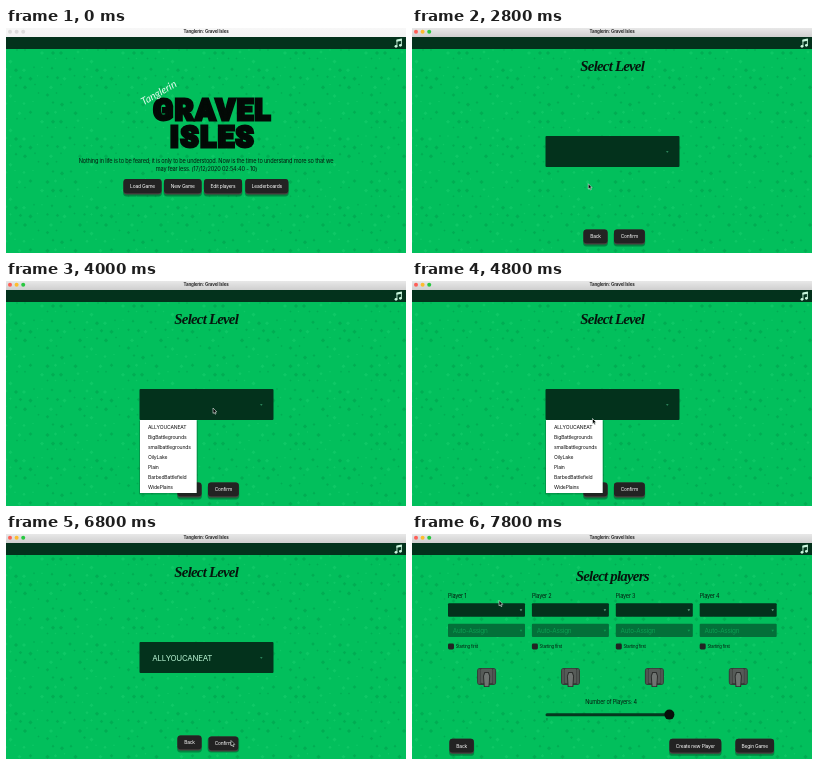
Animation, 400 px wide and 225 px high, one loop 8 s. Source, as an HTML page with a canvas:

```html
<!DOCTYPE html>
<html lang="en">
<head>
<meta charset="utf-8">
<title>Tanglerin: Gravel Isles</title>
<style>
  html, body { margin: 0; width: 100%; height: 100%; overflow: hidden; background: #02bf5c; }
  canvas { display: block; width: 100vw; height: 100vh; }
</style>
</head>
<body>
<canvas id="stage"></canvas>
<script>
const W = 400, H = 225, LOOP = 8000, STEP = 200;
const SANS = 'Inter, sans-serif', SERIF = '"Liberation Serif", serif';
const GREEN = '#02bf5c', DARK = '#03321c', INK = '#06180e', MINT = '#b8f2d2';
const canvas = document.getElementById('stage');
const ctx = canvas.getContext('2d');

// Moments at which the screens change
const LEVEL_AT = 2600, OPEN_AT = 3800, PICK_AT = 5800, PLAYERS_AT = 7000;
const LEVELS = ['ALLYOUCANEAT', 'BigBattlegrounds', 'smallbattlegrounds', 'OilyLake',
  'Plain', 'BarbedBattlefield', 'WidePlains'];

// Pointer path: time, x, y
const PATH = [
  [400, 200, 112], [1200, 179, 154.6], [2600, 179, 154.6], [3000, 173.5, 156.8],
  [3600, 207, 127], [4400, 207, 127], [5200, 154, 148], [5800, 154, 148],
  [6600, 225, 206.5], [7000, 225, 206.5], [7800, 87, 66.4]
];

function pointerAt(t) {
  if (t < PATH[0][0]) return null;
  for (let i = 1; i < PATH.length; i++) {
    const [t0, x0, y0] = PATH[i - 1], [t1, x1, y1] = PATH[i];
    if (t > t1) continue;
    const p = (t - t0) / (t1 - t0), k = p * p * (3 - 2 * p);
    return { x: x0 + (x1 - x0) * k, y: y0 + (y1 - y0) * k };
  }
  const [, x, y] = PATH[PATH.length - 1];
  return { x, y };
}

function inside(p, x, y, w, h) {
  return p && p.x >= x && p.x <= x + w && p.y >= y && p.y <= y + h;
}

function rect(x, y, w, h, fill, r = 0) {
  ctx.fillStyle = fill;
  ctx.beginPath();
  ctx.roundRect(x, y, w, h, r);
  ctx.fill();
}

function disc(x, y, r, fill) {
  ctx.fillStyle = fill;
  ctx.beginPath();
  ctx.arc(x, y, r, 0, Math.PI * 2);
  ctx.fill();
}

function poly(points, fill) {
  ctx.fillStyle = fill;
  ctx.beginPath();
  points.forEach(([x, y]) => ctx.lineTo(x, y));
  ctx.closePath();
  ctx.fill();
}

// Spacing defaults to the tight tracking of the interface font
function text(str, x, y, size, fill = INK, align = 'left', weight = '', family = SANS, spacing = -0.035 * size) {
  ctx.font = `${weight} ${size}px ${family}`;
  ctx.letterSpacing = spacing + 'px';
  ctx.textAlign = align;
  ctx.fillStyle = fill;
  ctx.fillText(str, x, y);
}

function backdrop() {
  rect(0, 0, W, H, GREEN);
  for (let j = 0; j < 24; j++) {
    for (let i = 0; i < 46; i++) {
      const seed = ((i % 9) * 37 + (j % 8) * 61 + (i % 9) * (j % 8) * 17) % 29;
      if (seed > 19) continue;
      const x = i * 9 + (j % 2) * 4.5 + seed % 3, y = 22 + j * 8.6 + seed % 4;
      const r = 1 + (seed % 4) * 0.35;
      const fill = seed % 3 ? 'rgba(0,130,62,.3)' : 'rgba(45,220,125,.28)';
      poly([[x, y - r], [x + r, y], [x, y + r], [x - r, y]], fill);
    }
  }
}

function windowBar(active) {
  const shade = ctx.createLinearGradient(0, 0, 0, 9);
  shade.addColorStop(0, active ? '#e8e8e8' : '#f7f7f7');
  shade.addColorStop(1, active ? '#cfcfcf' : '#f4f4f4');
  rect(0, 0, W, 9, shade);
  rect(0, 9, W, 12, DARK);
  ['#ff5f57', '#febc2e', '#28c840'].forEach((c, i) => disc(4 + i * 6.6, 3.8, 2, active ? c : '#dcdcdc'));
  text('Tanglerin: Gravel Isles', 200, 5.4, 4.5, '#2b2b2b', 'center', 'bold');
  // Music note
  const note = '#c9f6dd';
  poly([[390.5, 11.6], [395.8, 10.6], [395.8, 12.7], [390.5, 13.7]], note);
  rect(390.5, 12, 0.9, 6.6, note);
  rect(394.9, 11, 0.9, 6.4, note);
  disc(390, 18.3, 1.4, note);
  disc(394.4, 17.3, 1.4, note);
}

function button(label, x, y, w, h, p) {
  const over = inside(p, x, y, w, h + 2) ? 1 : 0;
  rect(x - 0.4, y + 1.5, w + 0.8, h + 1.5, 'rgba(0,50,25,.4)', 3.4);
  x += over * 0.6;
  w -= over * 1.2;
  y += over;
  rect(x, y, w, h + 1, '#483f3f', 3);
  rect(x, y, w, h - 0.2, '#232323', 3);
  text(label, x + w / 2, y + h / 2 + 1.8, 4.9, '#fff', 'center');
}

function arrow(x, y, fill = '#2b8058') {
  poly([[x - 1.3, y - 0.9], [x + 1.3, y - 0.9], [x, y + 1.1]], fill);
}

function heading(str, y) {
  text(str, 200.2, y, 14.8, '#06150d', 'center', 'italic bold', SERIF, -0.75);
}

function logoLine(str, y) {
  ctx.strokeStyle = '#030a06';
  ctx.lineWidth = 3;
  ctx.lineJoin = 'miter';
  ctx.miterLimit = 3;
  text(str, 206.7, y, 29, '#030a06', 'center', '900', 'Roboto, sans-serif', 1.7);
  ctx.strokeText(str, 206.7, y);
}

function menu(p) {
  logoLine('GRAVEL', 91.5);
  logoLine('ISLES', 118.5);
  ctx.save();
  ctx.translate(137.5, 77.5);
  ctx.rotate(-0.52);
  text('Tanglerin', 0, 0, 10.4, '#e6fbef', 'left', 'italic', 'Lato, sans-serif', 0);
  ctx.restore();
  text('Nothing in life is to be feared; it is only to be understood. Now is the time to understand more so that we',
    200, 134.7, 5.63, INK, 'center');
  text('may fear less. (17/12/2020 02:54:40 - 10)', 200.5, 142.7, 5.63, INK, 'center');
  button('Load Game', 117.5, 151, 38, 14.5, p);
  button('New Game', 158, 151, 37.5, 14.5, p);
  button('Edit players', 198, 151, 38, 14.5, p);
  button('Leaderboards', 239.3, 151, 43, 14.5, p);
}

function popup(p) {
  rect(133, 139.5, 59, 74, 'rgba(0,40,20,.25)', 1);
  rect(134, 139, 56.7, 73, '#fff');
  LEVELS.forEach((name, i) => {
    const y = 141 + i * 10;
    if (inside(p, 134, y, 56.7, 9.9)) rect(134.4, y, 56, 9.8, '#0893cf');
    text(name, 142, y + 6.8, 5.1, '#111');
  });
}

function levelScreen(t, p) {
  const open = t >= OPEN_AT && t < PICK_AT;
  heading('Select Level', 43);
  rect(133.5, 108, 134, 31, DARK, 1);
  arrow(255.3, 124);
  if (t >= PICK_AT) text(LEVELS[0], 146.3, 126.5, 7.95, MINT);
  button('Back', 171.5, 201.5, 24, 14, p);
  button('Confirm', 202, 201.5, 30.8, 14, p);
  if (open) popup(p);
}

function tank(x, y) {
  rect(x - 9.5, y - 9, 19, 17, '#353836', 3);
  rect(x - 8.6, y - 8, 2.6, 15, '#505552', 1.2);
  rect(x + 6, y - 8, 2.6, 15, '#505552', 1.2);
  rect(x - 5.6, y - 8.2, 11.2, 14.5, '#565b58', 1);
  poly([[x - 2.2, y - 5], [x + 2.2, y - 5], [x + 3.6, y - 1], [x + 2.8, y + 10], [x - 2.8, y + 10], [x - 3.6, y - 1]], '#2b2e2c');
  poly([[x - 1.4, y - 4], [x + 1.4, y - 4], [x + 2.6, y - 1], [x + 1.9, y + 9.2], [x - 1.9, y + 9.2], [x - 2.6, y - 1]], '#6f7471');
}

function playersScreen(p) {
  heading('Select players', 47);
  for (let i = 0; i < 4; i++) {
    const x = 36 + i * 83.9;
    text('Player ' + (i + 1), x, 64, 5.5);
    rect(x, 69.3, 77, 13.5, DARK, 1);
    arrow(x + 73, 76.2, '#63a884');
    rect(x, 89.7, 77, 13.4, '#037039', 1);
    text('Auto-Assign', x + 4.8, 98.7, 6.4, '#0ba052');
    arrow(x + 73, 96.6, '#0ba052');
    rect(x, 109.5, 6, 6, '#232323', 1.4);
    text('Starting first', x + 7.7, 114.1, 4.2);
    tank(x + 38.6, 143);
  }
  text('Number of Players: 4', 199, 170.2, 5.55, INK, 'center');
  rect(133.5, 179.3, 126, 3, '#05381f', 1.5);
  rect(134.6, 184, 0.7, 2.6, '#08683a');
  disc(257.4, 180.6, 5, '#07110b');
  button('Back', 37.5, 204.8, 24.3, 14, p);
  button('Create new Player', 257.5, 204.8, 51.7, 14, p);
  button('Begin Game', 323.5, 204.8, 38.5, 14, p);
}

function pointer({ x, y }) {
  const shape = [[0, 0], [0, 5.4], [1.2, 4.4], [2, 6.2], [3, 5.8], [2.2, 4], [3.8, 3.9]]
    .map(([a, b]) => [x + a, y + b]);
  poly(shape, '#000');
  ctx.strokeStyle = '#f4fff9';
  ctx.lineWidth = 0.55;
  ctx.lineJoin = 'round';
  ctx.stroke();
}

function draw(now) {
  const t = Math.floor((now % LOOP) / STEP) * STEP;
  const dpr = window.devicePixelRatio || 1;
  const w = Math.round(innerWidth * dpr), h = Math.round(innerHeight * dpr);
  if (canvas.width !== w || canvas.height !== h) {
    canvas.width = w;
    canvas.height = h;
  }
  ctx.setTransform(w / W, 0, 0, h / H, 0, 0);
  const p = pointerAt(t);
  backdrop();
  windowBar(t >= LEVEL_AT);
  if (t < LEVEL_AT) menu(p);
  else if (t < PLAYERS_AT) levelScreen(t, p);
  else playersScreen(p);
  if (p) pointer(p);
}

const start = performance.now();
function loop() {
  draw(performance.now() - start);
  requestAnimationFrame(loop);
}
loop();
</script>
</body>
</html>
```
